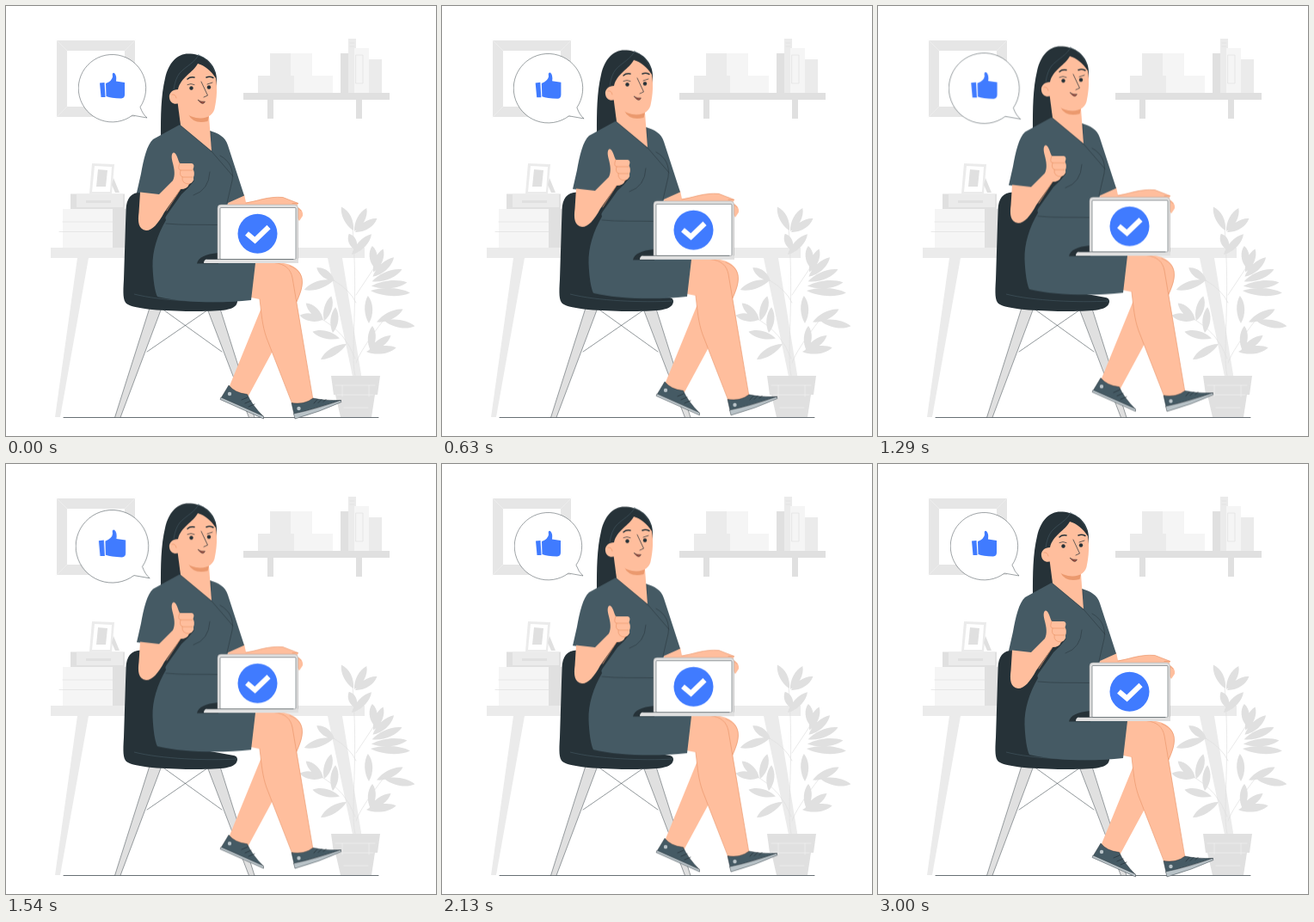
An HTML page that plays this animation: 500 px wide and 500 px high, repeating every 3.04 s.

```html
<!DOCTYPE html>
<html lang="en">
<head>
<meta charset="utf-8">
<title>Approved</title>
<style>
  html, body { margin: 0; width: 100%; height: 100%; overflow: hidden; background: #fff; }
  svg { display: block; width: 100vw; height: 100vh; }
  .person { animation: float 3040ms linear infinite; }
  .bubble { transform-origin: 124.4px 95px; animation: beat 3040ms ease-out infinite; }
  @keyframes float {
    0%, 98.684%, 100% { transform: translateY(0); }
    49.342% { transform: translateY(-10px); }
  }
  @keyframes beat {
    0%, 29.605%, 39.474%, 59.211%, 100% { transform: scale(1); }
    9.868%, 49.342% { transform: scale(1.1); }
  }
  .g1 { fill: #e0e0e0; }
  .g2 { fill: #ebebeb; }
  .g3 { fill: #f5f5f5; }
  .g4 { fill: #e6e6e6; }
  .dark { fill: #263238; }
  .cloth { fill: #455a64; }
  .sole { fill: #b9c3c8; }
  .skin { fill: #ffbe9d; }
  .shade { fill: #eb996e; }
  .blue { fill: #407bff; }
  .white { fill: #fff; }
  .line, .fine, .crease, .stem, .pale { fill: none; stroke: #263238; stroke-width: .7; stroke-linecap: round; stroke-linejoin: round; }
  .fine { stroke-width: .5; }
  .crease { stroke: #eb996e; }
  .stem { stroke: #e0e0e0; }
  .pale { stroke: #f0f0f0; }
  .edge { stroke: #263238; stroke-width: .45; stroke-linejoin: round; }
  .brow { fill: none; stroke: #263238; stroke-width: 1.5; stroke-linecap: round; }
  .strand { fill: none; stroke: #455a64; stroke-width: .6; }
</style>
</head>
<body>
<svg viewBox="0 0 500 500">
  <!-- wall picture -->
  <path class="g4" d="M59 40H150V129H59Z"/>
  <path class="white" d="M71 52H138V117H71Z"/>
  <path class="pale" d="M59 40L71 52M150 40L138 52M59 129L71 117"/>

  <!-- shelf -->
  <path class="g1" d="M276 101H446V109H276ZM304 109H311V131H304ZM407 109H414V131H407ZM389 55H398V101H389Z"/>
  <path class="g2" d="M307 55H331V81H307ZM293 81H335V101H293ZM398 38H407V101H398ZM422 62H437V101H422Z"/>
  <path class="g3" d="M331 55H356V81H331ZM335 81H380V101H335ZM405 49H422V101H405Z"/>
  <path class="stem" d="M400 43H405M400 47H405M407 57H415V90H407Z"/>

  <!-- desk and what stands on it -->
  <path class="g2" d="M83 293H96L63 478H57ZM374 293H391L421 478H413Z"/>
  <path class="g2" d="M100 183L126 184L123 218H97Z"/>
  <path class="white" d="M103 186L123 187L121 216H100Z"/>
  <path class="g1" d="M107 190L118 191L116 210H105ZM125 200L132 217H127L123 208Z"/>
  <path class="g1" d="M75 218.500H138V236H75ZM124 236H139V281H124Z"/>
  <path class="g2" d="M82 218.500H136V234H82Z"/>
  <path class="g1" d="M93 226H122V229H93Z"/>
  <path class="g3" d="M66 236H124V281H66Z"/>
  <path class="stem" d="M66 251H124M62 262.500H124"/>
  <path class="g2" d="M52 281H417V293H52Z"/>

  <!-- plant -->
  <path class="stem" d="M406 430C400 405 410 345 403 258M406 410Q395 380 369 365M407 345Q400 330 381 319M407 336L429 303M407 415Q412 400 440 364"/>
  <g id="leaves" class="g1"></g>
  <path class="g1" d="M378 430H435L432 452H429L425 478H389L383 452H381Z"/>
  <path class="pale" d="M383 441H429M385 452H427M391 441V454M422 441V454M393 467H421"/>

  <path class="line" d="M67 478.500H433"/>

  <!-- chair -->
  <path class="fine" d="M182 352.500L251 402M236 352.500L164 402"/>
  <path class="g1 edge" d="M167 351H181L133 478.500H126.500ZM234 352H249L289 478.500H282.500Z"/>
  <path class="dark" d="M157 216.500C145 217 140 224 139.500 237L137 318C136 334 136 342 140 346C150 353 185 354.500 215 355C250 355 264 354 268 347C270 343 269 340 265 339L215 330L195 240Z"/>
  <path class="strand" d="M149 335C180 343 235 345 268 343"/>

  <g class="person">
    <!-- rear leg and shoe -->
    <path class="skin" d="M312 298C333 298 346 307 344.500 323C344 333 337 347 331 359L308 405L281 455L259 444L299 346Z"/>
    <path class="crease" d="M330 302C342 307 346 315 344 326C343 334 336 348 331 359"/>
    <path class="cloth edge" d="M259 441Q266 450 280.500 451.500Q286 464 299 477L250 456Z"/>
    <path class="sole edge" d="M250 455L299.500 477V480L249 457.500Z"/>
    <circle class="sole" cx="260" cy="451" r="2.200"/>
    <path class="line" d="M274 458L281 455M278 462L285 459M282 466L289 463"/>

    <!-- front leg and shoe -->
    <path class="skin" d="M282 298C300 297 318 298 326 303C334 308 335 326 338 345L357 459L334 465L303 386C298 372 297 355 295 341L280 338Z"/>
    <path class="crease" d="M312 298.500C325 300 331 306 333 316L357 458M295 341C297 358 298 372 303 386L333 463"/>
    <path class="cloth edge" d="M332 461.500Q347 464 357 456Q370 459 390 458.500L335 475Z"/>
    <path class="sole edge" d="M334.500 474Q360 469 389 458.500L390 460.500Q365 472 336 480Z"/>
    <circle class="sole" cx="340.500" cy="468" r="2.200"/>
    <path class="line" d="M358 462L362 457.500M363 461.500L367 457.500M369 460.500L372 457.500"/>

    <!-- hair -->
    <path class="dark" d="M180 152C180 128 180 105 185 84C189 66 199 55.500 212 55.500C227 55.500 240 63 244 78Q246 86 244.500 98L205 142Z"/>

    <!-- far arm -->
    <path class="skin" d="M257 229L277 219L279 228.500C292 227 305 221 322 222.500L340 229.500L338 233Q346 237 345 244L341 250L337 243V236H262Z"/>
    <path class="crease" d="M279 229C292 227 305 221 322 222.500L340 229.500H333M338 234L343 238"/>

    <!-- dress -->
    <path class="cloth" d="M202 138Q191 144 171 155C164 161 160 178 157 195L152 217L179 220L186 249C176 266 170 285 170.500 303C171 318 173 332 176 338C205 345 250 346 285 342L290 299L268 288L252 255L258 229L277 220.500L258 162C255 152 247 148 237 145Z"/>
    <path class="dark" d="M222 299.500Q224 289 247 287V299.500Z"/>
    <path class="dark" d="M219 203Q212 212 204 219L187 243Q182 253 174 257L199 207Z"/>
    <path class="fine" d="M202 138L239 169L264 198M238 146V169M249 174C260 180 265 190 263 203L257 229M237 193Q236 214 218 220M186 253C205 255 226 254 246 254.500"/>

    <!-- neck and face -->
    <path class="skin" d="M199 108L203 138.500L239 168.500L236 128Z"/>
    <path class="shade" d="M212 126Q224 132 236 128L234.500 134Q218 138 212 126Z"/>
    <path class="skin" d="M244 84C238 75 231 69 223 67C218 77 203 83 200 97C194 97 189 101 190 107C191 113 196 115 201 113C203 121 211 128 221 130C233 132 242 127 243 117C245 108 246 95 244 84Z"/>
    <path class="crease" d="M193 103Q197 102 198 107"/>
    <path class="strand" d="M224 56C221 65 209 70 202 78Q197 84 195 97M224 57Q237 62 243 77"/>
    <path class="brow" d="M211 85Q214 82 219 83M233 83Q237 81.500 241 83.500"/>
    <circle class="dark" cx="215.500" cy="95.500" r="2.200"/>
    <circle class="dark" cx="236" cy="94.500" r="2.200"/>
    <path class="line" d="M211 91.500Q215 89.500 219 91.500M234 91L240 89M227 88L234.500 104L230 106"/>
    <path class="edge" fill="#a24e3f" d="M223 109Q227 112 231.500 111Q229 117 223 109Z"/>

    <!-- raised thumb -->
    <path class="skin" d="M156 216.500L178 219L194 203C197 197 196 190 193.500 181C192 175 192.500 171 195 170.500C198 170 200 179 202 183H216Q220 184 217.500 190Q220 194 218 199Q219 205 213 207Q211 213 203 213L184 240C177 253 170 261 163 261C154 260 153 251 154.500 240Z"/>
    <path class="crease" d="M202 183Q199 190 203 191H217M203 191Q201 198 206 199H217M205 199Q204 207 213 207M203 213L187 238"/>

    <!-- laptop -->
    <rect class="g1" x="246" y="231" width="93.500" height="67" rx="4" stroke="#a6a6a6" stroke-width=".5"/>
    <rect class="white edge" x="249" y="234.500" width="88" height="60" rx="1"/>
    <path class="g1" d="M230 299Q230 294.500 234 294.500H340V299Z"/>
    <path class="fine" d="M234 294.500H334"/>
    <circle class="blue" cx="292.500" cy="264.700" r="23"/>
    <path d="M280 264.500L289.500 272.500L305.500 257" fill="none" stroke="#fff" stroke-width="6"/>
  </g>

  <g class="bubble">
    <path class="white edge" d="M156 117.500A39.200 39.200 0 1 0 147 127L164 130Q159 126 156 117.500Z"/>
    <path class="blue" d="M109 89.500L114.500 89L115.500 106H110.500ZM116 90Q123.500 87 124 82Q123 77 126 78Q129 81 128 87.500L138 89V103Q138 107 134 107.500Q122 107 116.500 105Z"/>
  </g>
</svg>
<script>
  const leafWidth = 8;
  const mix = (a, b, t) => a + (b - a) * t;

  function leafPath(x, y, degrees, length) {
    const c = Math.cos(degrees * Math.PI / 180), s = Math.sin(degrees * Math.PI / 180);
    const at = (u, v) => `${x + u * length * c - v * leafWidth * s} ${y + u * length * s + v * leafWidth * c}`;
    return `M${at(0, 0)}C${at(.3, .8)} ${at(.75, .8)} ${at(1, 0)}C${at(.75, -.7)} ${at(.3, -.7)} ${at(0, 0)}`;
  }

  // leaves turn from one angle to the other while their foot slides along the stem
  function fan(count, [x0, y0], [x1, y1], [from, to], [first, last]) {
    return Array.from({ length: count }, (_, i) => {
      const t = i / (count - 1);
      const turn = 1 - (1 - t) ** 1.5;
      return leafPath(mix(x0, x1, t), mix(y0, y1, t), mix(from, to, turn), mix(first, last, t));
    }).join('');
  }

  const leaves = [
    fan(3, [404, 261], [406, 263], [-117, -32], [31, 30]),
    fan(2, [407, 284], [402, 289], [-113, -46], [21, 33]),
    fan(6, [428, 304], [424, 331], [-95, 3], [25, 46]),
    fan(2, [382, 320], [381, 319], [-143, -198], [26, 36]),
    fan(3, [370, 366], [368, 365], [-74, -169], [30, 27]),
    fan(3, [380, 380], [396, 393], [-84, -211], [30, 35]),
    fan(3, [422, 369], [440, 366], [-92, 10], [32, 36]),
    fan(3, [424, 401], [419, 402], [-86, -8], [29, 35])
  ].join('');
  document.getElementById('leaves').innerHTML = `<path d="${leaves}"/>`;
</script>
</body>
</html>
```
